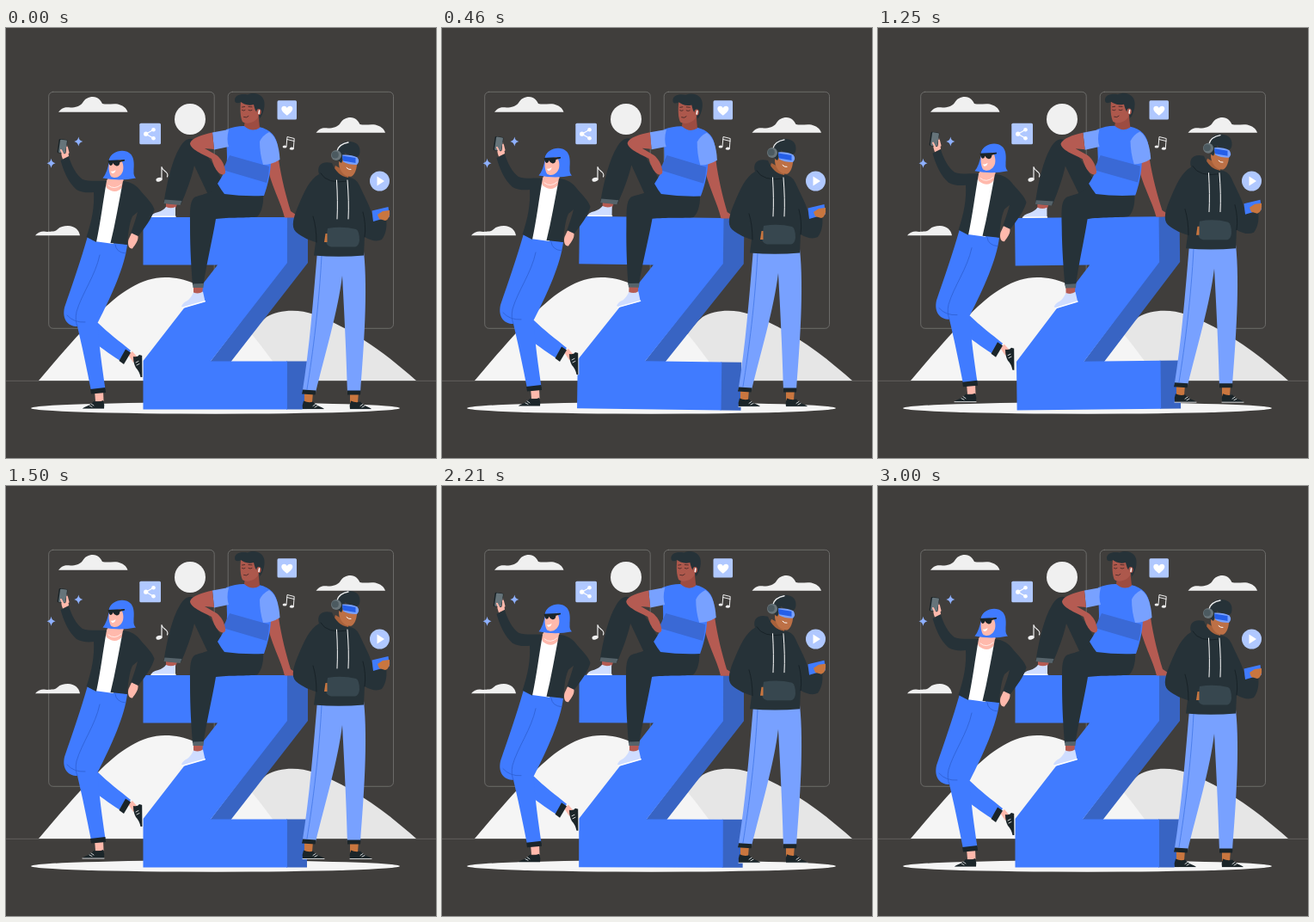
Write an HTML page that moves like this. It is 500x500 px and loops after 3040 ms.

```html
<!DOCTYPE html>
<html lang="en">
<head>
<meta charset="utf-8">
<title>Three friends and a letter</title>
<style>
  html, body { margin: 0; width: 100%; height: 100%; overflow: hidden; background: #403e3c; }
  svg { display: block; width: 100vw; height: 100vh; }
  .blue { fill: #407bff; }
  .shade { fill: #3864c3; }
  .sky { fill: #78a1ff; }
  .icon { fill: #b0c8ff; }
  .dark { fill: #263238; }
  .cuff { fill: #1b2529; }
  .white { fill: #fff; }
  .pale { fill: #f0f0f0; }
  .pink { fill: #ffb9ac; }
  .red { fill: #b55b52; }
  .tan { fill: #c9763f; }
  .line { fill: none; stroke-linecap: round; stroke-linejoin: round; }
</style>
</head>
<body>
<svg viewBox="0 0 500 500">
  <defs>
    <path id="cloud" d="M61 97.700C65 92.500 69 91.500 75 92.500C81 92.500 86 91 89 87C92 82 96 80 101 80C107 80 110 84 112 88C118 89.500 124 87.500 130 88.500C136 90 140 93 141.500 97.700Z"/>
    <path id="spark" d="M0-5.500Q.8-.8 5 0Q.8.800 0 5.500Q-.8.800-5 0Q-.8-.8 0-5.500Z"/>
    <g id="shoe">
      <path class="cuff" d="M0 9.500C3 7 9 6 13 1Q18 3 24 0Q26 5 25 10H0Z"/>
      <path class="line" stroke="#fff" stroke-width=".8" d="M0 10H25M10 4l3 2M8 6l3 1.500"/>
    </g>
  </defs>

  <!-- Backdrop -->
  <g class="line" stroke="#777674" stroke-width=".8">
    <rect x="49.700" y="74.300" width="192.500" height="275" rx="5"/>
    <rect x="258.200" y="74.300" width="192.300" height="275" rx="5"/>
    <path stroke="#6a6967" d="M0 410.300H500"/>
  </g>
  <g class="pale">
    <use href="#cloud"/>
    <use href="#cloud" x="299.500" y="24"/>
    <path d="M34 241.200C37 237 43 235.500 48 237C53 236.500 57 237 60 234C63 231 67 230 72 230C80 230 85 235 86 241.200Z"/>
    <circle cx="214" cy="106" r="18"/>
  </g>
  <path fill="#e6e6e6" d="M250 410C275 372 288 348 303 336C318 327 341 327 358 333C395 346 437 374 477 410Z"/>
  <path fill="#f5f5f5" d="M38 410C60 384 84 356 106 334C132 307 158 290 185 290C210 290 228 300 245 314C270 335 296 366 326 410Z"/>
  <ellipse cx="243.500" cy="442" rx="214.500" ry="6.700" fill="#f5f5f5"/>

  <!-- Icons -->
  <g class="icon">
    <rect x="155.300" y="110.800" width="24.700" height="24.400" rx="1.500"/>
    <rect x="315.500" y="84.300" width="22.500" height="22.300" rx="1.500"/>
    <circle cx="434.500" cy="178" r="11.500"/>
  </g>
  <g class="white">
    <circle cx="162.700" cy="123.200" r="2.600"/>
    <circle cx="171.500" cy="118.300" r="2.300"/>
    <circle cx="171.500" cy="128.200" r="2.300"/>
    <path class="line" stroke="#fff" stroke-width="1.300" d="M171.500 118.300L162.700 123.200L171.500 128.200"/>
    <path d="M326.800 101.800C322 98 320.300 96 320.300 93.800C320.300 90.500 325 89.500 326.800 93C328.600 89.500 333.300 90.500 333.300 93.800C333.300 96 331.500 98 326.800 101.800Z"/>
    <path d="M431.500 172.500L440 178L431.500 183.500Z"/>
  </g>
  <g class="pale">
    <ellipse cx="178" cy="176.300" rx="3.600" ry="2.300" transform="rotate(-15 178 176.300)"/>
    <path class="line" stroke="#f0f0f0" stroke-width="1.200" d="M181 176V161.500C182 167 190 167 187.500 173"/>
    <ellipse cx="324" cy="138" rx="2.400" ry="1.600"/>
    <ellipse cx="332.300" cy="140.200" rx="2.400" ry="1.600"/>
    <path class="line" stroke="#f0f0f0" d="M326 138L327 126.500L335.200 128.500L334.300 140M326.700 129.500L335 131.500"/>
  </g>
  <g fill="#8eb0ff">
    <use href="#spark" x="84.300" y="132"/>
    <use href="#spark" x="52.500" y="157.300"/>
  </g>

  <!-- Letter with seated man -->
  <g id="sway">
    <path class="shade" d="M326 220H351V273L260 390H236L326 272ZM326 387.500H350V443.500H326Z"/>
    <path class="blue" d="M159.500 220H327V273L238 387.500H327V443.500H159.500V387L246 275.500H159.500Z"/>

    <path class="red" d="M186 204L199 205L196 212L186 211Z"/>
    <path fill="#cfddff" d="M186 208Q192 210.500 197 208V219.500H169Q169 216 177 214Q183 212 186 208Z"/>
    <path class="line" stroke="#fff" stroke-width="1.500" d="M169 219.300H197"/>
    <path class="dark" d="M183.500 203C187 180 193 154 202 139C207 130 214 126 220 131C231 142 245 164 259 190L252 203L236 196L219 160C215 177 209 192 203.500 205Z"/>
    <path fill="#56636a" d="M184.500 199.500L204.500 201L202.500 206L183.500 204Z"/>

    <path class="red" d="M218 300H229L228 312L218 311Z"/>
    <path fill="#cfddff" d="M218 307.500Q224 310 229 306.500L231.500 318L206 325.500L204 323.500Q206 319 211 317Q215 314 218 307.500Z"/>
    <path class="line" stroke="#fff" stroke-width="1.500" d="M205.500 325.300L231.300 317.700"/>
    <path class="dark" d="M246 180C243 193 227 193 219 197C213 202 214 215 214 230C214 258 215.500 280 217 299H229.500C233 275 240 246 244 222C258 220 282 221 292 219.500C298 214 300 202 299 191Z"/>
    <path fill="#56636a" d="M217 297.500L230 297L229.500 302H217.500Z"/>

    <path class="red" d="M303 157L317 153C320 174 326 197 331 213L337 217Q338 220.500 334 220.500H324C320 203 307 181 303 157Z"/>
    <path class="blue" d="M256 118Q267 114 276 114L294 115C308 118 315 126 316 139L308 157C307 172 304 184 300 195Q276 196 254 193Q250 188 246 181C252 172 257 163 257 150Z"/>
    <path fill="#3a69d5" d="M260 148L306 161Q306 171 303 180L252 165Z"/>
    <path class="sky" d="M306 121Q317 128 318.500 153Q309 159 299 159Q295 146 295 132Q298 125 306 121Z"/>
    <path class="sky" d="M240 121.500L259 118Q256 130 259 138L242 141.500Z"/>
    <path class="red" d="M240 121.500C228 124 216 128 214 134C214 141 229 147 239 152C241 158 243 164 247 168C251 172 256 171 255 166C254 158 250 152 245 148L231 140L242 141Z"/>

    <path fill="#9d4c41" d="M278 106L293 97L295 116Q286 122 277 114Z"/>
    <path fill="#ad584c" d="M273 86C272 95 272.500 104 275 109C281 113 290 109 293 104L297 92L287 83Z"/>
    <path class="dark" d="M266 84C266 78 273 76 281 77.500C290 73.500 300 78 300.500 87C301 95 298 101 295.500 105L292 98C290 97 289 93 288 89C281 91 276 88 273 86C270 88 266 88 266 84Z"/>
    <ellipse cx="294" cy="97.500" rx="2.700" ry="3.600" fill="#ad584c"/>
    <path class="line" stroke="#fff" stroke-width="1.500" d="M294.500 96L294 99.500"/>
    <path class="line" stroke="#3a2525" stroke-width=".8" d="M274.500 95.500q2 1.300 3.500 0M282 95.500q2 1.300 4 0M274.500 92l3-.5M282 91.500l4 .3M276.500 103.500q3.500 1.500 5.500-1"/>
  </g>

  <!-- Woman with phone -->
  <g class="float">
    <path class="pink" d="M142 380L147 376L153 383L148 389Z"/>
    <path class="cuff" d="M148 382Q153 383 155 380L158.500 381L159 406L156.500 406Q155 399 151 395Q148 390 148 382Z"/>
    <path class="line" stroke="#fff" stroke-width=".8" d="M158.800 381V406M151 389l3-1.500M152 392l3-1.500"/>
    <path class="blue" d="M98 340L107 343C118 354 133 365 145 375L136 389C125 382 112 373 102 365Z"/>
    <path class="cuff" d="M139 373.500L145 377.500L137 391L131.500 387Z"/>
    <path class="pink" d="M103 421H113L113.500 434H104Z"/>
    <use href="#shoe" x="89" y="433"/>
    <path class="blue" d="M95 242L141 252C138 277 123 311 106.500 343C108 368 112 396 115.500 420L99 422C94 396 88 368 83 347C72 347 65 339 68 325C77 299 87 270 95 242Z"/>
    <path class="cuff" d="M98 420L115.500 418L116 424L99 425.500Z"/>
    <path class="line" stroke="#2e5fd0" stroke-width=".8" d="M109 264C104 288 88 309 82 330Q80 340 83 347M71 334Q79 343 92 342M127 252Q128 261 139 262"/>
    <path class="white" d="M112 182H137L125 251L103 248Z"/>
    <path class="pink" d="M122 169L137 170L136 184Q128 195 117 186L115 181Z"/>
    <path class="line" stroke="#fff" stroke-width=".7" d="M119 183Q126 189 134 182"/>
    <path class="dark" d="M63.500 154L73 149.500C76 160 82 171 89 176C98 179 108 177 117 178C113 200 110 226 105 249L93.500 243C100 224 103 207 102 191C95 192 87 191 82 188C73 180 67 167 63.500 154Z"/>
    <path class="dark" d="M136 178C146 179 152 183 157 190C164 198 171 205 172.500 211C170 221 161 233 153 243L145 239C148 230 151 222 153 214L147 219C143 228 142 240 141 252L121.500 250C127 228 131 204 136 178Z"/>
    <path class="pink" d="M146 238.500L153.500 242C154 248 150 252 147 256.500C143 257 141 252 142.500 246Z"/>
    <path class="pink" d="M64 135Q67 131 71 136L73 149L66 152.500Q63 145 64 135Z"/>
    <g transform="rotate(8 66 138)">
      <rect x="60.500" y="129.500" width="10" height="16.500" rx="1.500" class="cuff"/>
      <rect x="62" y="130" width="8" height="15.500" rx="1" fill="#66747a"/>
    </g>
    <path class="line" stroke="#ffb9ac" stroke-width="2" d="M71 139L72.500 145M64 142L67 148"/>
    <path class="blue" d="M120 154C121 145 132 141 140 143.500C150 147 149 158 148.500 166Q148 172 151 174.500Q132 178.500 112.500 174.500Q118 168 120 154Z"/>
    <path class="pink" d="M121 153C119 158 119 168 122 172.500C127 176 134 173 136 166L138 153Z"/>
    <path class="blue" d="M119.500 154.500C121 145 134 141 142 149L137 164Q136 157 134 152.500Q126 156 119.500 154.500Z"/>
    <path class="cuff" d="M118.500 154L138 153V154.500L132.500 156Q132 160.500 128.500 160.500Q125.500 160 124.500 157Q123.500 160.500 121.500 160Q119.500 159 118.500 154Z"/>
    <path class="white" d="M121.500 166.500Q125 167.500 127.500 165Q127 169 123.500 169Z"/>
  </g>

  <!-- Man with visor -->
  <g class="float">
    <path class="tan" d="M347 423H357L356 436H347ZM400 423H410L409 436H400Z"/>
    <use href="#shoe" transform="matrix(-1 0 0 1 370 433.500)"/>
    <use href="#shoe" transform="matrix(-1 0 0 1 425 433.500)"/>
    <path class="sky" d="M362 260H416C421 307 416 371 412 424H397C396 381 393 324 391 288C386 329 371 379 360 424H344.500C353 371 357 319 362 260Z"/>
    <path class="line" stroke="#477bea" stroke-width=".9" d="M367 265C364 322 357 377 350 420"/>
    <path class="cuff" d="M345 420.500L360.500 421.500L359.500 426.500L344 425.500ZM397 421.500H412.500L412 426.500H397Z"/>
    <path fill="#a8613b" d="M383 160L398 168V180L386 178L380 170Z"/>
    <path class="dark" d="M379 157C367 154 361 160 364 170C353 176 347 190 341 204C334 220 331 231 337 237C345 244 354 247 360 249L358 264.500Q387 267 416 264.500L417 243Q429 250 437 246C443 238 443 229 442 219L427 223C425 209 416 195 411 183Q407 174 398 174Q385 172 379 157Z"/>
    <path class="line" stroke="#151f24" stroke-width=".8" d="M366 169Q373 182 398 178M361 249Q361 232 357 219M417 243Q419 229 415 214"/>
    <path fill="#37474f" d="M374 233Q391 230 407 234Q411 236 411 247Q410 254 406 254.500H378Q372 253 372 247Z"/>
    <path class="tan" d="M371.500 239L373.500 239V249H370Z"/>
    <path class="line" stroke="#fff" d="M384.500 177Q386 202 385 222M397 177Q399 202 398 222"/>
    <path class="blue" d="M425.500 212.500L444.500 208L446 219.500L427 225Z"/>
    <path class="tan" d="M432 217L438 213L446 212Q447 222 441 224L434 222Z"/>
    <path fill="#bd7046" d="M388 148L408 150C409 160 407 169 402 172.500C395 174 388 168 387 158Z"/>
    <path class="dark" d="M385 150C383 138 390 131 400 132Q412 133 411.500 144Q411 150 407 150Q399 149 394 145Q393 152 390 157Q386 155 385 150Z"/>
    <path class="line" stroke="#f0f0f0" stroke-width="1.300" d="M385 143Q387 135 398 133"/>
    <circle cx="384" cy="148" r="6" fill="#69757a"/>
    <circle cx="382.800" cy="147.500" r="4" fill="#4c5a60"/>
    <path class="sky" d="M391 147.500Q402 147 408.500 150.500Q412 155 408 159Q398 159 392 155.500Z"/>
    <path fill="#255fe8" d="M391 148.500L406.500 151V157L392 154.500Z"/>
    <path class="line" stroke="#fff" d="M396 162.500Q398 165 401 164.500"/>
  </g>
</svg>
<script>
  const LOOP = 3040, RISE = 3000, SWAY = 1500;
  const sway = document.getElementById('sway');
  const floaters = document.querySelectorAll('.float');

  // Triangle wave: 0 at the ends, 1 halfway.
  const tri = p => 1 - Math.abs(2 * p - 1);

  // Swings 0 -> 1 -> -1 -> 0 in straight segments.
  const swing = p => 2 * tri((p + 0.25) % 1) - 1;

  function draw(now) {
    const t = Math.min(now % LOOP, RISE);
    const lift = -10 * tri(t / RISE);
    const angle = swing(t / SWAY % 1);
    floaters.forEach(g => g.setAttribute('transform', `translate(0 ${lift})`));
    sway.setAttribute('transform', `rotate(${angle} 255 259.500)`);
  }

  function frame() {
    draw(performance.now());
    requestAnimationFrame(frame);
  }
  draw(0);
  requestAnimationFrame(frame);
</script>
</body>
</html>
```
